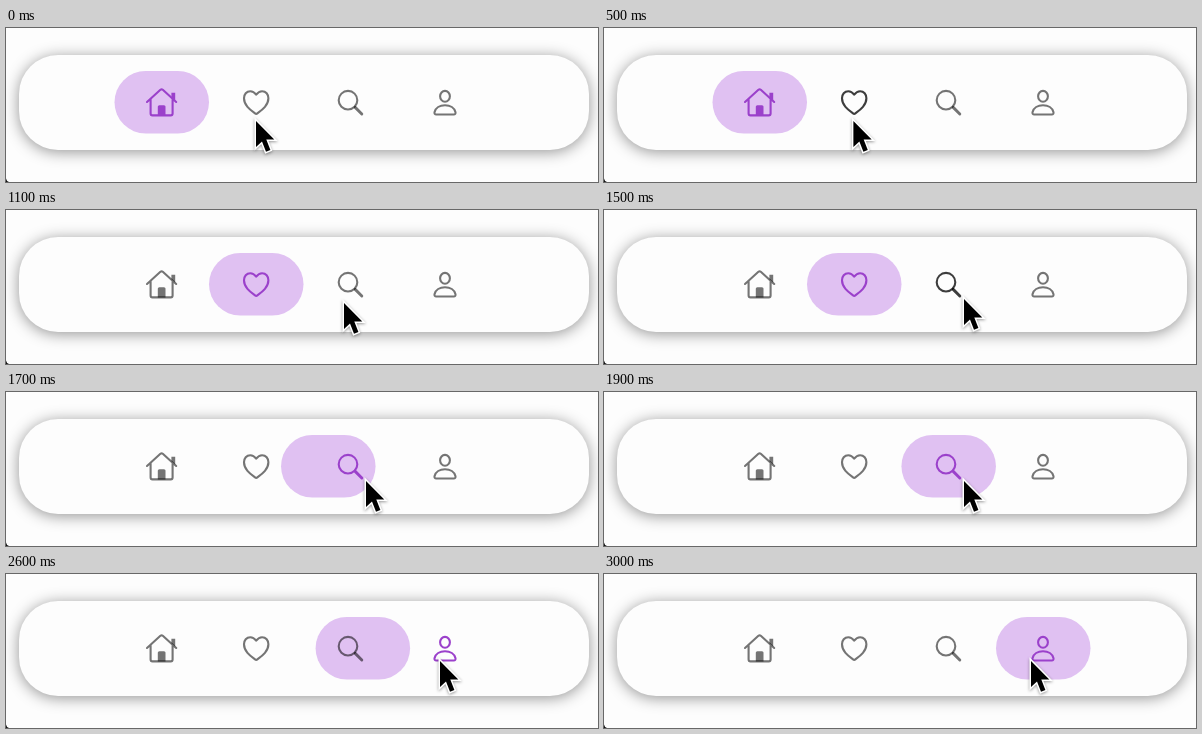
Write an HTML page that moves like this. It is 592x154 px and loops after 3.1 s.

```html
<!DOCTYPE html>
<html lang="en">
<head>
<meta charset="utf-8">
<title>Tab bar</title>
<style>
  html, body { margin: 0; width: 100%; height: 100%; overflow: hidden; background: #fdfdfd; }
  .bar {
    position: absolute; left: 12.5px; top: 27px; width: 570px; height: 95px;
    border-radius: 39px; background: #fdfdfd; box-shadow: 0 2px 15px rgba(0, 0, 0, .42);
  }
  svg { position: absolute; left: 0; top: 0; }
  .icon { fill: none; stroke: currentColor; stroke-width: 2.1; stroke-linecap: round; stroke-linejoin: round; }
  #cursor { filter: drop-shadow(0 1px 1.5px rgba(0, 0, 0, .4)); }
</style>
</head>
<body>
<div class="bar"></div>
<svg width="592" height="154" viewBox="0 0 592 154">
  <path d="M0 150.5Q.5 153.5 3 154H0Z" fill="#111"/>
  <rect id="pill" x="108.5" y="43" width="94.5" height="62.5" rx="31.2" fill="#e0c1f2"/>
  <g class="icon">
    <path d="M141 74 154.4 61.8Q155.6 60.8 156.8 61.8L170.2 74M144.6 71.5V85.6Q144.6 87.4 146.4 87.4H164.8Q166.6 87.4 166.6 85.6V71.5"/>
    <path d="M165.4 64.8H169.2V72.6L165.4 69.2Z" fill="currentColor" stroke="none"/>
    <path d="M151.8 87.4V78.8Q151.8 77.3 153.3 77.3H158Q159.5 77.3 159.5 78.8V87.4Z" fill="currentColor" stroke="none"/>
  </g>
  <path class="icon" d="M250.2 66.7C248.2 64 246.4 63.2 244.3 63.2 240.5 63.2 238 66.4 238 70.2 238 77.3 244.3 81.8 249 85.4Q250.2 86.3 251.4 85.4C256.1 81.8 262.4 77.3 262.4 70.2 262.4 66.4 259.9 63.2 256.1 63.2 254 63.2 252.2 64 250.2 66.7Z"/>
  <g class="icon">
    <circle cx="342" cy="72.2" r="9.3"/>
    <path d="M349.2 79.4 355.8 86" stroke-width="2.9"/>
  </g>
  <g class="icon">
    <ellipse cx="439" cy="68.3" rx="4.9" ry="5.4"/>
    <path d="M439 77.3C433.8 77.3 429.5 80 428.5 84.3 428.2 85.6 429 86.5 430.2 86.5H447.8C449 86.5 449.8 85.6 449.5 84.3 448.5 80 444.2 77.3 439 77.3Z"/>
  </g>
  <path id="cursor" d="M0 0V26L6 20.5 10 30.7 14.4 29 10.3 18.6H18.3Z"
        fill="#000" stroke="#fff" stroke-width="3" paint-order="stroke"/>
</svg>
<script>
  const LOOP = 3100, STEP = 100, SLIDE = 400, GAP = 94.5;
  const REST = 'rgba(0,0,0,.54)', HOVER = 'rgba(0,0,0,.76)', ACTIVE = '#9b41cb';
  const pill = document.getElementById('pill');
  const cursor = document.getElementById('cursor');
  const icons = document.querySelectorAll('.icon');

  // Each visit: hover start, then click (ms)
  const visits = [[400, 552], [1200, 1515], [2300, 2552]];
  // Cursor tip: time, x, y
  const path = [
    [0, 250, 93], [800, 249, 93], [1000, 325, 93], [1100, 338, 93], [1300, 360, 89],
    [1900, 360, 89], [2000, 376, 89], [2100, 404, 89], [2300, 434, 87], [2600, 434, 87],
    [2900, 427, 87], [LOOP, 427, 87]
  ];

  const bez = (s, a, b) => 3 * s * (1 - s) ** 2 * a + 3 * s * s * (1 - s) * b + s ** 3;

  // CSS "ease": cubic-bezier(.25, .1, .25, 1)
  function ease(x) {
    if (x <= 0 || x >= 1) return x <= 0 ? 0 : 1;
    let lo = 0, hi = 1;
    for (let i = 0; i < 20; i++) {
      const mid = (lo + hi) / 2;
      if (bez(mid, .25, .25) < x) lo = mid; else hi = mid;
    }
    return bez(lo, .1, 1);
  }

  function tip(t) {
    const i = path.findIndex(p => p[0] > t);
    const [t0, x0, y0] = path[i - 1], [t1, x1, y1] = path[i];
    const k = (t - t0) / (t1 - t0);
    return [x0 + (x1 - x0) * k, y0 + (y1 - y0) * k];
  }

  function draw(t) {
    let slot = 0, active = 0, hovered = -1;
    visits.forEach(([hover, click], i) => {
      slot += ease((t - click) / SLIDE);
      if (t >= click) active = i + 1;
      else if (t >= hover) hovered = i + 1;
    });
    pill.setAttribute('transform', `translate(${slot * GAP})`);
    cursor.setAttribute('transform', `translate(${tip(t)})`);
    icons.forEach((icon, i) => {
      icon.style.color = i === active ? ACTIVE : i === hovered ? HOVER : REST;
    });
  }

  const start = performance.now();
  function tick() {
    const t = (performance.now() - start) % LOOP;
    draw(Math.floor(t / STEP) * STEP);
    requestAnimationFrame(tick);
  }
  tick();
</script>
</body>
</html>
```
